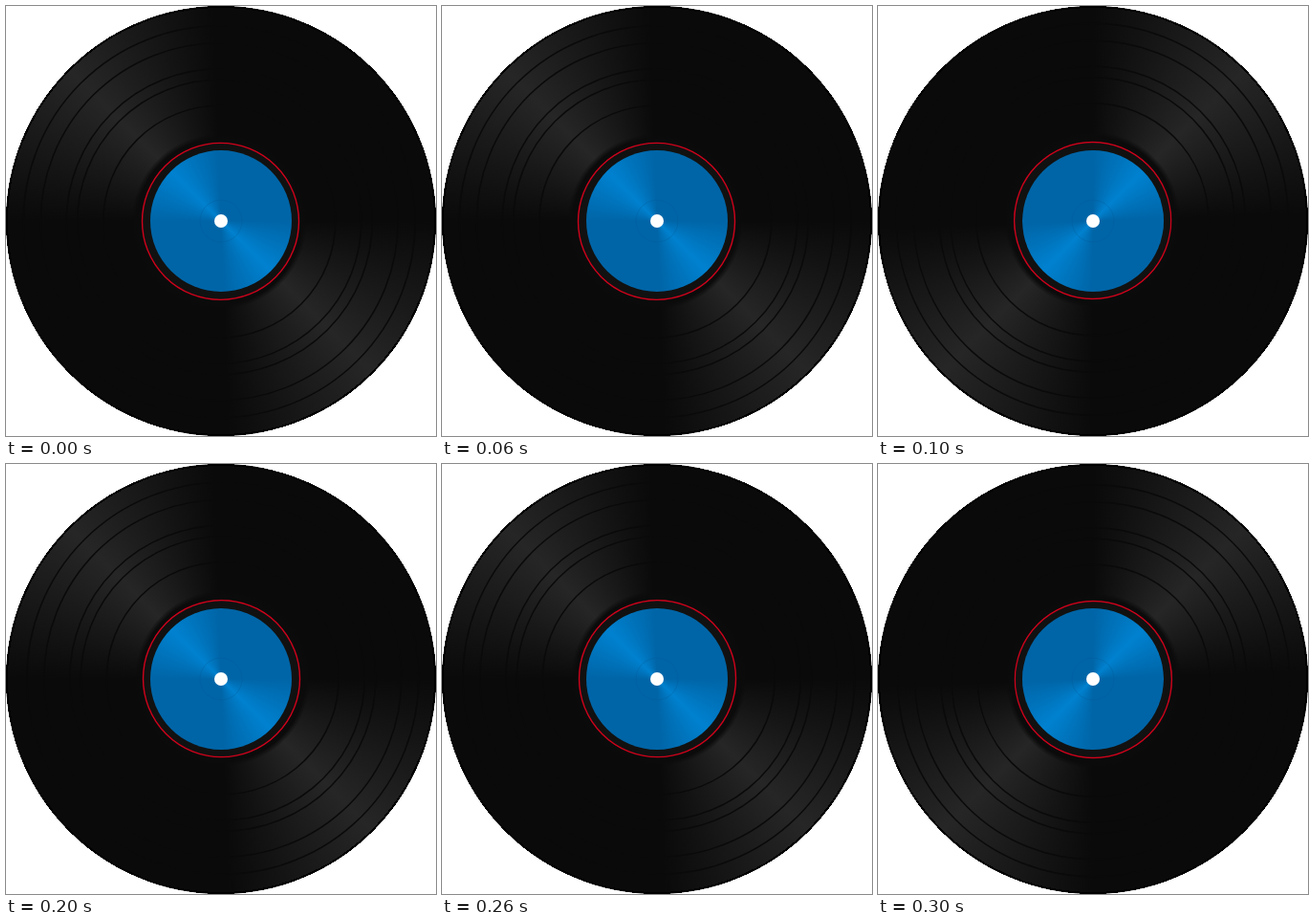
An HTML page that plays this animation: 450 by 450 pixels, repeating every 0.4 s.

```html
<!DOCTYPE html>
<html lang="en">
<head>
<meta charset="utf-8">
<title>Spinning record</title>
<style>
  html, body { margin: 0; width: 100%; height: 100%; overflow: hidden; background: #fff; }
  .stage, .record, .record > *, .fixed { position: absolute; width: 450px; height: 450px; left: 0; top: 0; }
  .stage { overflow: hidden; }

  /* Quarter turns with hard jumps */
  .record { animation: spin 400ms steps(4, end) infinite; }
  @keyframes spin { to { transform: rotate(360deg); } }

  .sheen {
    border-radius: 50%;
    background: conic-gradient(from 90deg,
      var(--dark) 0deg, var(--light) 45deg, var(--dark) 88deg 180deg,
      var(--light) 225deg, var(--dark) 268deg 360deg);
  }
  .vinyl { --dark: #0a0a0a; --light: #262626; }
  .record > .label {
    --dark: #0065a7; --light: #0081cf;
    left: 151px; top: 151px; width: 148px; height: 148px;
  }
</style>
</head>
<body>
<div class="stage">
  <div class="record">
    <div class="sheen vinyl"></div>
    <svg viewBox="0 0 450 450" fill="none">
      <defs>
        <radialGradient id="well">
          <stop offset=".94" stop-color="#0b0b0b"/>
          <stop offset="1" stop-color="#0b0b0b" stop-opacity="0"/>
        </radialGradient>
      </defs>
      <!-- Grooves sit slightly off the spindle, so they wobble -->
      <g transform="translate(223.2 225.8)" stroke="#0a0a0a" stroke-width="1.5">
        <circle r="121.5"/>
        <circle r="148.5"/>
        <circle r="160"/>
        <circle r="187"/>
        <circle r="205"/>
        <circle r="92" fill="url(#well)" stroke="none"/>
      </g>
      <circle cx="224.5" cy="225.4" r="82" fill="#111" stroke="#d0021b" stroke-width="1.4"/>
    </svg>
    <div class="sheen label"></div>
  </div>
  <svg class="fixed" viewBox="0 0 450 450" fill="none">
    <circle cx="225" cy="225" r="224" stroke="#000" stroke-width="2" shape-rendering="crispEdges"/>
    <circle cx="225" cy="225" r="22" stroke="#005c99" stroke-opacity=".35"/>
    <circle cx="225" cy="225" r="7" fill="#fff"/>
  </svg>
</div>
</body>
</html>
```
